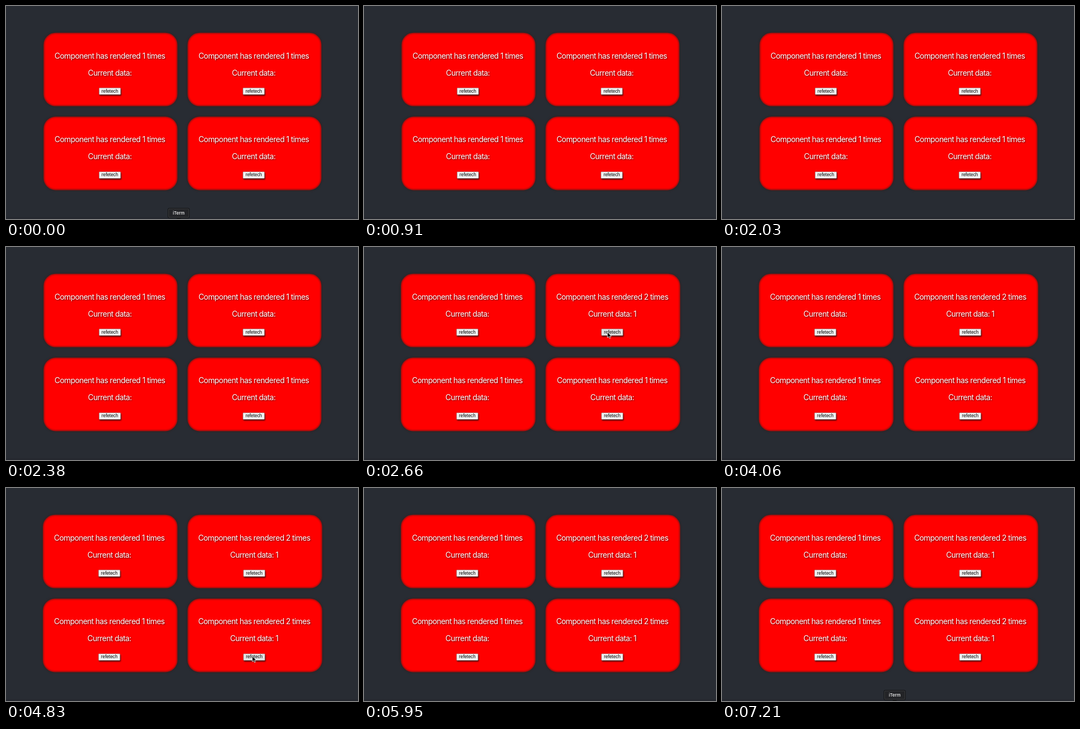
Write an HTML page that moves like this. It is 640 px wide and 388 px high and loops after 7280 ms.

```html
<!DOCTYPE html>
<html lang="en">
<head>
<meta charset="utf-8">
<title>Render counters</title>
<style>
  html, body { margin: 0; width: 100%; height: 100%; overflow: hidden; background: #282c33; }
  svg { display: block; width: 640px; height: 388px; }
  text { text-anchor: middle; }
  .label { font: 14px Inter, Roboto, sans-serif; font-kerning: none; letter-spacing: -0.58px; fill: #fff; filter: drop-shadow(1.3px 1.8px 1px rgba(0, 0, 0, .65)); }
  .caption { font: 8.3px "Liberation Sans", Arial, sans-serif; fill: #000; }
  .tip { font: 500 8px Inter, Roboto, sans-serif; fill: #fff; }
  .button { filter: drop-shadow(1.8px 2px 1.1px rgba(0, 0, 0, .7)); }
  .edge { fill: none; stroke: #32201f; stroke-opacity: .7; stroke-width: 2.6; filter: blur(1.4px); }
</style>
</head>
<body>
<svg id="stage" viewBox="0 0 640 388">
  <rect width="640" height="388" fill="#282c33"/>
  <rect y="385" width="640" height="3" fill="#25282f"/>
  <g id="cards"></g>
  <g id="tooltip">
    <path d="M309 386h10l-5 4z" fill="#17181a"/>
    <rect x="294.5" y="368.5" width="39" height="17.5" rx="2" fill="#232427" stroke="#101113"/>
    <rect x="295.5" y="369.5" width="37" height="15.5" rx="1.5" fill="none" stroke="#4b4d50" stroke-width=".6"/>
    <text class="tip" x="314" y="380">iTerm</text>
  </g>
  <path id="cursor" d="M0 0V10.2L2.4 8L4 11.5L5.7 10.8L4.2 7.4H7.3Z" fill="#000" stroke="#fff" stroke-width=".8" stroke-linejoin="round"/>
</svg>
<script>
const LOOP = 7280;
const CLICKS = [
  { card: 1, from: 2660, to: 3640, x: 442.5, y: 155 },
  { card: 3, from: 4830, to: 5530, x: 447.8, y: 306.3 }
];
const TIP_OFF = 700, TIP_ON = 6160;
const ROW = 152.8;
const $ = id => document.getElementById(id);

function add(parent, tag, attrs) {
  const el = document.createElementNS("http://www.w3.org/2000/svg", tag);
  set(el, attrs);
  parent.append(el);
  return el;
}

function set(el, attrs) {
  for (const key in attrs) el.setAttribute(key, attrs[key]);
}

function say(el, text) {
  if (el.textContent !== text) el.textContent = text;
}

function show(el, on) {
  el.style.display = on ? "" : "none";
}

function makeCard(index) {
  const g = add($("cards"), "g", { transform: `translate(0 ${index > 1 ? ROW : 0})` });
  const box = { y: 48.7, height: 133.9, rx: 22 };
  const body = add(g, "rect", { ...box, fill: "#f00" });
  const edge = add(g, "rect", { ...box, class: "edge" });
  const content = add(g, "g", {});
  const count = add(content, "text", { class: "label", y: 95.5 });
  const data = add(content, "text", { class: "label", y: 126.5 });
  const button = add(content, "g", { class: "button" });
  const face = add(button, "rect", { x: -19.5, y: 149.2, width: 39, height: 12, rx: .8, stroke: "#858585", "stroke-width": .5 });
  add(content, "text", { class: "caption", y: 157.7 }).textContent = "refetech";
  return { body, edge, content, count, data, face };
}

const cards = [0, 1, 2, 3].map(makeCard);

function draw(t) {
  const wide = t >= CLICKS[0].from;
  const active = CLICKS.find(c => t >= c.from && t < c.to);

  cards.forEach((card, i) => {
    const right = i % 2;
    const x = right ? 330.1 : wide ? 67 : 68.3;
    const width = wide ? 244.8 : 243.4;
    const center = right ? (wide ? 451.3 : 450.4) : (wide ? 187.8 : 188.8);
    const fetched = CLICKS.some(c => c.card === i && t >= c.from);
    const hover = active && active.card === i;
    set(card.body, { x, width });
    set(card.edge, { x, width });
    set(card.content, { transform: `translate(${center} 0)` });
    say(card.count, `Component has rendered ${fetched ? 2 : 1} times`);
    say(card.data, fetched ? "Current data: 1" : "Current data:");
    set(card.face, { fill: hover ? "#e3e3e3" : "#f0f0f0" });
  });

  show($("tooltip"), t < TIP_OFF || t >= TIP_ON);
  show($("cursor"), active);
  if (active) set($("cursor"), { transform: `translate(${active.x} ${active.y})` });
}

const start = performance.now();
function tick() {
  draw((performance.now() - start) % LOOP);
  requestAnimationFrame(tick);
}
tick();
</script>
</body>
</html>
```
